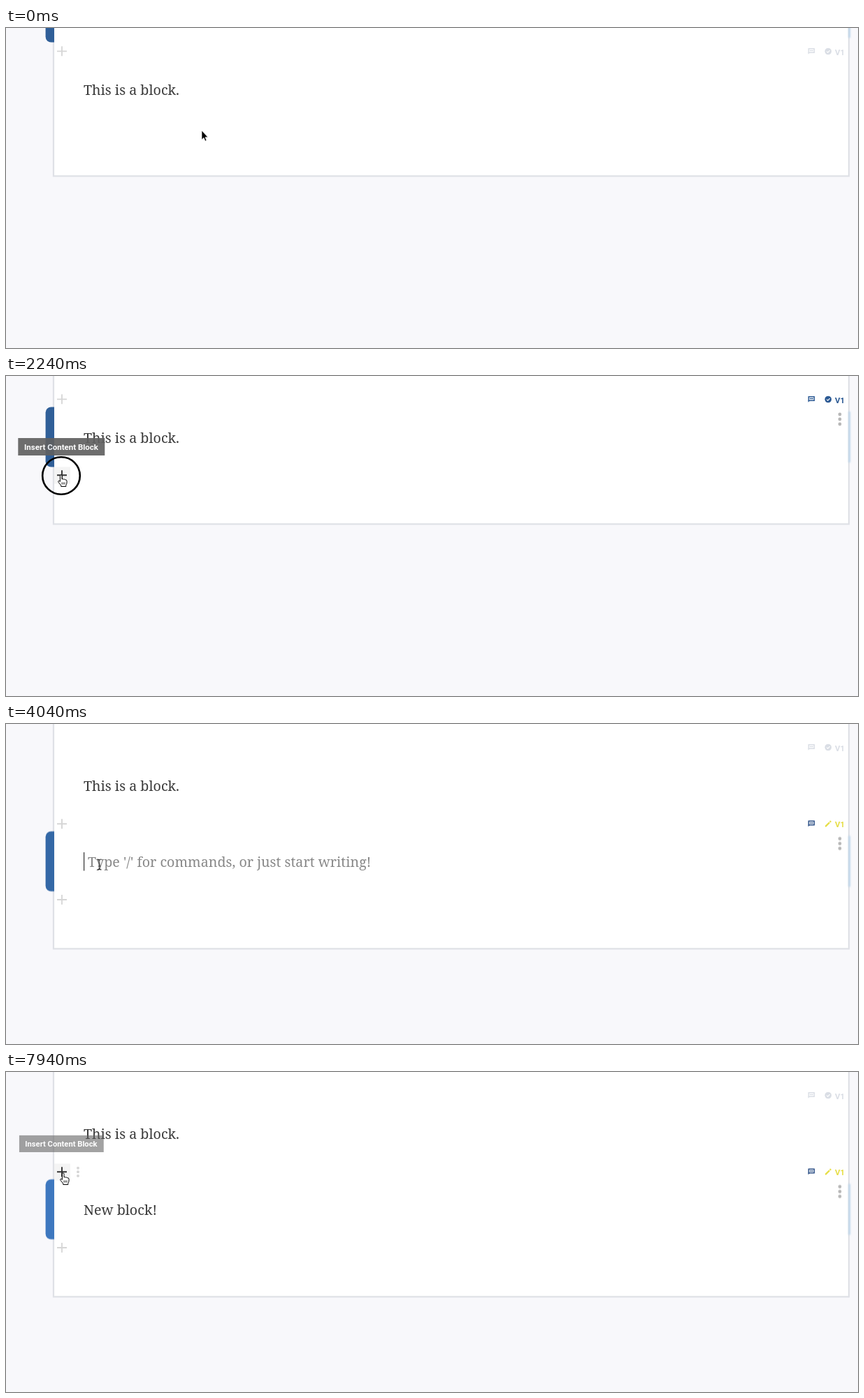
Animation of 1219x459 px, one loop 8000 ms. Source, as an HTML page:

```html
<!DOCTYPE html>
<html lang="en">
<head>
<meta charset="utf-8">
<title>Inserting a block</title>
<style>
html, body { margin: 0; width: 100%; height: 100%; overflow: hidden; background: #f8f8fb; }
svg { display: block; width: 1219px; height: 459px; }
.anim { animation: 8s linear infinite; }
.hard { animation-timing-function: step-end; }
.serif { font: 19.7px "Noto Serif", serif; fill: #3a3a3a; }
.label { font: bold 11.5px Roboto, sans-serif; }
.plus { fill: none; stroke: #d6d6d6; stroke-width: 1.8; }

#focus { animation-name: slide; animation-timing-function: ease; }
@keyframes slide {
  0%, 8% { transform: translateY(-110px); }
  13%, 37.5% { transform: translateY(0); }
  42.5%, 100% { transform: translateY(109.5px); }
}
#bar { animation-name: tint; }
@keyframes tint {
  0%, 38% { fill: #305f98; }
  50.5% { fill: #3468a6; }
  63%, 100% { fill: #3e78bf; }
}
#page { animation-name: grow; }
@keyframes grow {
  0% { transform: translateY(0); }
  37.5%, 100% { transform: translateY(110px); }
}
.drop { animation-name: drop; }
@keyframes drop {
  0% { transform: translateY(0); }
  37.5%, 100% { transform: translateY(1px); }
}
#plusTop { animation-name: leave; }
@keyframes leave { 0% { opacity: 1; } 37.5%, 100% { opacity: 0; } }
#plusEnd, #statusNew { animation-name: arrive; }
@keyframes arrive { 0%, 37.5% { opacity: 0; } 40.5%, 100% { opacity: 1; } }
#plusMid { animation-name: plusMid; }
@keyframes plusMid {
  0%, 8% { opacity: 0; stroke: #d6d6d6; }
  13%, 18.5% { opacity: 1; stroke: #d6d6d6; }
  19.25% { stroke: #999; }
  21%, 43.2% { stroke: #333; }
  45%, 96.5% { stroke: #d6d6d6; }
  97.5%, 100% { opacity: 1; stroke: #333; }
}
#hover { animation-name: hover; }
@keyframes hover {
  0%, 18.5% { opacity: 0; }
  21%, 43.2% { opacity: 1; }
  45%, 96.5% { opacity: 0; }
  97.5%, 100% { opacity: 1; }
}
#grip { animation-name: grip; }
@keyframes grip {
  0%, 18.5% { opacity: 0; }
  19.25% { opacity: .4; }
  22%, 38% { opacity: 0; }
  40%, 43.2% { opacity: 1; }
  45%, 96.5% { opacity: 0; }
  97.5%, 100% { opacity: 1; }
}
#statusOld { animation-name: status; }
@keyframes status {
  0%, 8% { color: #dadee5; }
  12%, 37.5% { color: #2c5a94; }
  41%, 100% { color: #dadee5; }
}
#tip { transform-origin: 79px 114px; animation-name: tip; }
@keyframes tip {
  0%, 23% { opacity: 0; transform: scale(0); }
  24% { opacity: .6; transform: scale(.975); }
  25%, 43.8% { opacity: .92; transform: scale(1); }
  45% { opacity: 0; transform: scale(1); }
  45.1%, 98.2% { opacity: 0; transform: scale(0); }
  99.25% { opacity: .58; transform: scale(.975); }
  100% { opacity: .92; transform: scale(1); }
}
#ring { transform-origin: 79px 143px; animation-name: ring; }
@keyframes ring {
  0%, 25.4% { opacity: 0; transform: scale(.3); }
  26% { opacity: 1; }
  28%, 29.25% { opacity: 1; transform: scale(1); }
  35%, 100% { opacity: 0; transform: scale(1); }
}
#hint { animation-name: hint; }
@keyframes hint { 0% { opacity: 0; } 50.5% { opacity: 1; } 57.375%, 100% { opacity: 0; } }

#pointer { animation-name: move; animation-timing-function: ease-in-out; }
@keyframes move {
  0%, .4% { transform: translate(280px, 147px); }
  6.1%, 14.5% { transform: translate(190px, 95px); }
  19.25% { transform: translate(75px, 148px); }
  24.8%, 40% { transform: translate(79px, 142px); }
  43% { transform: translate(88px, 160px); animation-timing-function: ease-out; }
  46.1%, 87.4% { transform: translate(133.5px, 201px); }
  91.5% { transform: translate(4px, 280px); }
  97.4%, 100% { transform: translate(82px, 145px); }
}
#arrow { animation-name: arrow; }
@keyframes arrow {
  0% { opacity: 1; } 3% { opacity: 0; } 16% { opacity: 1; }
  18.3% { opacity: 0; } 88.4% { opacity: 1; } 97%, 100% { opacity: 0; }
}
#hand { animation-name: hand; }
@keyframes hand {
  0% { opacity: 0; } 18.3% { opacity: 1; } 45% { opacity: 0; } 97%, 100% { opacity: 1; }
}
#beam { animation-name: beam; }
@keyframes beam {
  0% { opacity: 0; } 3% { opacity: 1; } 16% { opacity: 0; } 45% { opacity: 1; }
  57.375% { opacity: 0; } 87.5% { opacity: 1; } 88.4%, 100% { opacity: 0; }
}
</style>
</head>
<body>
<svg viewBox="0 0 1219 459">
  <defs>
    <filter id="soft" x="-200%" width="500%"><feGaussianBlur stdDeviation="1.3"/></filter>
    <path id="cross" d="M-7 0H7M0-7V7"/>
    <g id="note">
      <path d="M1148.4 29.7h8v5.6h-8z" fill="none" stroke="currentColor" stroke-width="1.5"/>
      <path d="M1147.7 35v2.8l2.2-2z" fill="currentColor"/>
      <path d="M1149.8 32.5h5.2" stroke="currentColor" stroke-width="1.3"/>
    </g>
  </defs>

  <g id="page" class="anim hard">
    <rect x="68" y="-150" width="1138" height="362.4" fill="#fff" stroke="#dfe1e6" stroke-width="2.2"/>
  </g>

  <g id="focus" class="anim">
    <path id="bar" class="anim" d="M69 44.5H64.6a8 8 0 0 0-8 8v70a8 8 0 0 0 8 8h4.4z"/>
    <rect x="1205.5" y="51" width="2.4" height="73" fill="#b9d3ea" filter="url(#soft)"/>
    <g fill="#b8b8b8">
      <circle cx="1193" cy="55" r="2.4"/><circle cx="1193" cy="62" r="2.4"/><circle cx="1193" cy="69" r="2.4"/>
    </g>
  </g>

  <g id="plusTop" class="anim hard"><use href="#cross" class="plus" x="80" y="33.3"/></g>
  <g id="plusEnd" class="anim"><use href="#cross" class="plus" x="80" y="252"/></g>

  <g id="statusOld" class="anim" fill="currentColor">
    <use href="#note"/>
    <circle cx="1176.3" cy="33.5" r="4.8"/>
    <path d="M1174.2 33.6l1.6 1.6 2.9-3.1" fill="none" stroke="#fff" stroke-width="1.1"/>
    <text class="label" x="1186" y="38.6">V1</text>
  </g>
  <g id="statusNew" class="anim">
    <use href="#note" y="109.5" color="#2c4f86"/>
    <g fill="#e6de45">
      <path d="M1172 147.4v-1.6l5.4-5.4 1.6 1.6-5.4 5.4zM1178 139.8l1-1q.5-.4 1 0l.6.6q.4.5 0 1l-1 1z"/>
      <text class="label" x="1186" y="148">V1</text>
    </g>
  </g>

  <text class="serif" x="111" y="95.7">This is a block.</text>
  <text id="hint" class="serif anim hard" x="117" y="205.2" style="fill:#888">Type '/' for commands, or just start writing!</text>
  <text id="typed" class="serif" x="111" y="205.2"></text>
  <path id="caret" d="M.6 184V210.5" stroke="#333" stroke-width="1.2"/>

  <g class="anim hard drop">
    <rect id="hover" class="anim" x="69" y="130.5" width="23" height="24" fill="#f4f4f4"/>
    <g id="plusMid" class="anim" fill="none" stroke-width="1.9"><use href="#cross" x="80" y="142.3"/></g>
    <g id="grip" class="anim" fill="#d6d6d6">
      <circle cx="103" cy="136.7" r="2"/><circle cx="103" cy="142.3" r="2"/><circle cx="103" cy="148" r="2"/>
    </g>
    <g id="tip" class="anim">
      <rect x="17.3" y="89" width="124" height="25" fill="#616161"/>
      <text class="label" x="26" y="106" fill="#fff">Insert Content Block</text>
    </g>
  </g>

  <circle id="ring" class="anim" cx="79" cy="143" r="26.8" fill="none" stroke="#000" stroke-width="2.6"/>

  <g id="pointer" class="anim">
    <path id="arrow" class="anim hard" d="M0 0V13.2L3 10.5 5 15.2 7 14.3 5 9.8H9z" stroke="#fff" stroke-width=".7"/>
    <g id="hand" class="anim hard" fill="#fff" stroke="#000" stroke-linejoin="round">
      <path d="M-1.6 9.5V1.3a1.3 1.3 0 0 1 2.6 0V6q1.4-.9 2.4.3 1.5-.7 2.3.5 1.9-.4 2.3 1.5V11q0 2-1.2 3.5v2H-.2V15L-3.6 10.8q-1.3-1.7-.3-2.3t2.3 1z"/>
      <path d="M1 10.5v3M3 10.5v3M5 10.5v3" stroke-width=".8"/>
    </g>
    <path id="beam" class="anim hard" d="M-3-7q3 0 3 2 0-2 3-2M0-5V6M-3 8q3 0 3-2 0 2 3 2M-1.5 3h3" fill="none" stroke="#222" stroke-width="1.1"/>
  </g>
</svg>
<script>
const $ = id => document.getElementById(id);
const phrase = 'New block!';
// [time in ms, letters on the line]
const keys = [[4590, 1], [5190, 2], [5440, 5], [5640, 6], [5740, 7], [5890, 8], [6040, 9], [6190, 10]];
const caretOn = [[4040, 4440], [4590, 5040], [5190, 6540], [7000, 7500]];
const lead = 30; // changes are ready by the next paint
const clock = $('bar').getAnimations()[0];

function draw() {
  const t = ((clock.currentTime || 0) + lead) % 8000;
  const count = keys.reduce((n, [at, len]) => t >= at ? len : n, 0);
  const line = phrase.slice(0, count);
  if ($('typed').textContent !== line) $('typed').textContent = line;
  const x = 111 + (count ? $('typed').getComputedTextLength() : 0);
  $('caret').setAttribute('transform', `translate(${x} 0)`);
  $('caret').style.opacity = caretOn.some(([a, b]) => t >= a && t < b) ? 1 : 0;
  requestAnimationFrame(draw);
}
draw();
</script>
</body>
</html>
```
